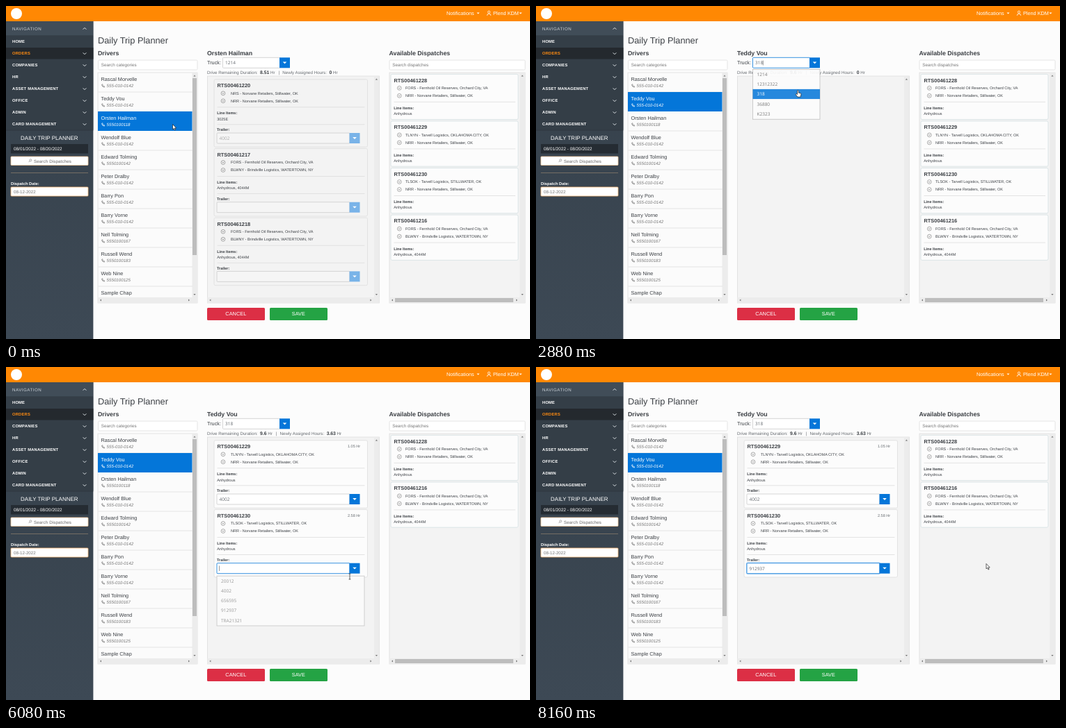
Animation of 753x480 px, one loop 8.24 s. Source, as an HTML page:

```html
<!DOCTYPE html>
<html lang="en">
<head>
<meta charset="utf-8">
<title>Daily Trip Planner</title>
<style>
html, body { margin: 0; width: 100%; height: 100%; overflow: hidden; background: #fcfcfc; }
svg { display: block; width: 100vw; height: 100vh; }
text { font-family: "Liberation Sans", Arial, sans-serif; white-space: pre; text-rendering: geometricPrecision; }
.b { font-weight: 700; }
.i { font-style: italic; }
.os { font-family: "Open Sans", sans-serif; }
</style>
</head>
<body>
<svg viewBox="0 0 753 480" preserveAspectRatio="none">
  <defs>
    <clipPath id="listClip"><path d="M132 96H268V419H132Z"/></clipPath>
    <linearGradient id="side" x2="0" y2="1">
      <stop offset="0" stop-color="#35404a"/><stop offset="1" stop-color="#3d4955"/>
    </linearGradient>
  </defs>
  <g id="base"></g>
  <g id="scene"></g>
</svg>
<script>
const LOOP = 8240, STEP = 80;
const BLUE = '#0476d9', INK = '#3b3f44', GREY = '#666b70';

// Vertical position is the middle of the capitals.
const text = (x, y, s, size, fill = INK, cls = '', more = '') =>
  `<text x="${x}" y="${y + size * 0.36}" font-size="${size}" fill="${fill}" class="${cls}" ${more}>${s}</text>`;
const rect = (x, y, w, h, fill, stroke = 'none', r = 0, more = '') =>
  `<rect x="${x}" y="${y}" width="${w}" height="${h}" fill="${fill}" stroke="${stroke}" stroke-width=".8" rx="${r}" ${more}/>`;
const line = (d, stroke, w = 0.8) => `<path d="${d}" fill="none" stroke="${stroke}" stroke-width="${w}"/>`;
const shape = (d, fill) => `<path d="${d}" fill="${fill}"/>`;
const caret = (x, y, w, fill) => shape(`M${x - w} ${y - w / 2}h${2 * w}l${-w} ${w}z`, fill);

const drivers = [
  ['Rascal Morvelle', '555-010-0142'], ['Teddy Vou', '555-010-0142'], ['Orsten Hailman', '5550100118'],
  ['Wendolf Blue', '555-010-0142'], ['Edward Tolming', '5550100142'], ['Peter Dralby', '555-010-0142'],
  ['Barry Pon', '555-010-0142'], ['Barry Vorne', '555-010-0142'], ['Nell Tolming', '5550100167'],
  ['Russell Wend', '5550100183'], ['Web Nine', '5550100125'], ['Sample Chap', '']
];

const stops = {
  oil: 'FORS - Fernhold Oil Reserves, Orchard City, VA',
  green: 'BLWNY - Brindville Logistics, WATERTOWN, NY',
  shop: 'NRR - Norvane Retailers, Stillwater, OK',
  shop2: 'NRS - Norvane Retailers, Stillwater, OK',
  city: 'TLNYN - Tarvell Logistics, OKLAHOMA CITY, OK',
  still: 'TLSOK - Tarvell Logistics, STILLWATER, OK'
};
const trip = (id, from, to, items) => ({ id: 'RTS0046' + id, from: stops[from], to: stops[to], items });
const trips = {
  1216: trip(1216, 'oil', 'green', 'Anhydrous, 4044M'),
  1217: trip(1217, 'oil', 'green', 'Anhydrous, 4044M'),
  1218: trip(1218, 'oil', 'green', 'Anhydrous, 4044M'),
  1220: trip(1220, 'shop2', 'shop', '3025E'),
  1228: trip(1228, 'oil', 'shop', 'Anhydrous'),
  1229: trip(1229, 'city', 'shop', 'Anhydrous'),
  1230: trip(1230, 'still', 'shop', 'Anhydrous')
};
const trucks = ['1214', '12312322', '318', '36880', 'K2323'];
const trailers = ['20012', '4002', '656595', '912937', 'TRA21321'];

// Time, tip x, tip y, pointer kind.
const path = [
  [0, 239.5, 170.5, 'arrow'], [320, 231, 143, 'arrow'], [720, 230.5, 142.5, 'arrow'],
  [960, 230, 139.5, 'arrow'], [1200, 230, 139.5, 'arrow'], [1680, 401, 82, 'arrow'],
  [2000, 401, 82, 'hand'], [2560, 376.5, 121.5, 'hand'], [2960, 376.5, 121.5, 'arrow'],
  [3200, 611, 205, 'arrow'], [3280, 611, 205, 'arrow'], [3680, 420, 150, 'arrow'],
  [3840, 420, 150, 'arrow'], [4000, 501, 190, 'arrow'], [4080, 501, 190, 'hand'],
  [4200, 450, 220, 'hand'], [4280, 450, 220, 'arrow'], [4400, 611, 205, 'arrow'],
  [4440, 611, 205, 'arrow'], [4880, 446.5, 271, 'arrow'], [5080, 420, 250, 'arrow'],
  [5280, 420, 250, 'arrow'], [5840, 501, 291, 'arrow'], [5960, 501, 291, 'beam'],
  [6080, 494, 302, 'beam'], [6160, 494, 303, 'hand'], [6640, 429.5, 342.5, 'hand'],
  [7040, 429.5, 342.5, 'arrow'], [7760, 647, 283.5, 'arrow'], [LOOP, 647, 283.5, 'arrow']
];
const clamp = v => Math.min(1, Math.max(0, v));
const during = (t, a, b) => t >= a && t < b;
const fade = (t, a, b, c, d) => Math.min(clamp((t - a) / (b - a)), clamp((d - t) / (d - c)));

function pointerAt(t) {
  const n = path.findIndex((p, k) => t >= p[0] && (!path[k + 1] || t < path[k + 1][0]));
  const a = path[n], b = path[n + 1] || a;
  const u = clamp((t - a[0]) / (b[0] - a[0] || 1)), e = u * u * (3 - 2 * u);
  return { x: a[1] + (b[1] - a[1]) * e, y: a[2] + (b[2] - a[2]) * e, kind: a[3] };
}

function pointer({ x, y, kind }) {
  const d = {
    arrow: 'M0 0V7.4L1.7 5.9 2.9 8.6 4.1 8 2.9 5.4H5.2Z',
    hand: 'M-1 .8C-1-.3 .7-.3 .7.8V3.6L3.6 4.2Q4.6 4.6 4.4 5.8L3.7 9.6H-.6L-3.2 6.2Q-3.4 4.8-2 5.2L-1 6.1Z',
    beam: 'M-1.4-4H1.4M0-4V4M-1.4 4H1.4'
  }[kind];
  return `<path transform="translate(${x} ${y})" d="${d}" fill="#fff" stroke="#222" stroke-width=".7"/>`;
}

function stopIcon(x, y) {
  return `<circle cx="${x}" cy="${y}" r="2.9" fill="none" stroke="#777" stroke-width=".6"/>` +
    line(`M${x - 1.3} ${y - 0.5}l1.3 1.2l1.3-1.2`, '#666', 0.7);
}

function field(x, y, w, value, { focus, off, glow } = {}) {
  return (glow ? rect(x - 0.6, y - 0.6, w + 1.2, 16.2, 'none', '#8cc0f0', 1) : '') +
    rect(x, y, w, 15, off ? '#f5f5f5' : '#fff', focus ? BLUE : '#ccc', 1) +
    rect(x + w - 0.5, y, 15, 15, off ? '#79b3e8' : BLUE) +
    caret(x + w + 7, y + 7.5, 2.8, '#fff') +
    text(x + 3.5, y + 7.7, value, 6.5, off ? '#aaa' : GREY, 'os');
}

function menu(x, y, w, list, alpha, p) {
  if (alpha <= 0) return '';
  const H = 14.2, top = y + (1 - alpha) * 6;
  const hover = alpha > 0.8 && p.x > x && p.x < x + w ? Math.floor((p.y - y) / H) : -1;
  const rows = list.map((s, k) => {
    const on = k === hover;
    return (on ? rect(x, top + k * H, w, H, BLUE) : '') +
      text(x + 6, top + k * H + 7.2, s, 6.5, on ? '#fff' : '#666', 'os');
  });
  return rect(x, top, w, H * 5 + 0.8, '#fcfcfc', '#bbb', 0, `opacity="${0.5 + alpha / 2}"`) +
    `<g opacity="${alpha}">${rows.join('')}</g>`;
}

function card(x, y, trip, { wide, trailer, off, hours } = {}) {
  const w = wide ? 220.5 : 183, h = trailer ? 97.5 : 65.3, tx = x + 4.5;
  const icon = x + (wide ? 13 : 12.3), label = x + (wide ? 24 : 21);
  const rule = dy => line(`M${tx} ${y + dy}H${x + w - 4}`, '#ddd');
  return rect(x, y, w, h, off ? '#f3f3f3' : '#fcfcfc', wide ? '#ddd' : '#d5e0e3', 2) +
    text(tx, y + 8.7, trip.id, 7.4, INK, 'b') +
    (hours ? text(x + 192, y + 8.7, hours + ' Hr', 5.5, GREY) : '') +
    stopIcon(icon, y + 20) + text(label, y + 20, trip.from, 5.5) +
    stopIcon(icon, y + 31) + text(label, y + 31, trip.to, 5.5) +
    rule(40) + text(tx - 0.3, y + 48.7, 'Line Items:', 5.5, INK, 'b') + text(tx - 0.3, y + 56.8, trip.items, 5.5) +
    (trailer ? rule(65) + text(tx - 0.5, y + 72.5, 'Trailer:', 5.5, INK, 'b') +
      field(x + 4, y + 77.2, 191, trailer.value, trailer) : '');
}

function scrollArrows(x, y, w, h) {
  const tri = (px, py, a) => `<path transform="translate(${px} ${py}) rotate(${a})" d="M-1.6 1L0-1L1.6 1Z" fill="#777"/>`;
  return rect(x + w - 7.5, y, 7.5, h, '#ececec') + rect(x, y + h - 8, w, 8, '#ececec') +
    tri(x + w - 4, y + 4.5, 0) + tri(x + w - 4, y + h - 12, 180) +
    tri(x + 4, y + h - 4, 270) + tri(x + w - 12, y + h - 4, 90);
}

function phoneIcon(x, y, color) {
  return line(`M${x} ${y - 1.8}q.4 3.2 3.8 3.8l.5-1.2l-1.4-.7l-.7.5l-1-1.1l.5-.6l-.5-1.4z`, color, 0.7);
}

function searchBox(x, w, s) {
  return rect(x, 78, w, 14, '#fff', '#ddd', 1.5) + text(x + 4.3, 85.2, s, 6.3, '#777');
}

function sidebar() {
  const items = ['HOME', 'ORDERS', 'COMPANIES', 'HR', 'ASSET MANAGEMENT', 'OFFICE', 'ADMIN', 'CARD MANAGEMENT'];
  const chevron = (y, d = 1) => line(`M110.5 ${y - d}l2.5 ${2 * d}l2.5 ${-2 * d}`, '#dde2e6', 0.9);
  const W = 125.4;
  return rect(0, 22, W, 458, 'url(#side)') + rect(0, 22, W, 20.5, '#414d58') +
    text(9, 32.5, 'NAVIGATION', 6.2, '#cbd2d8', '', 'letter-spacing=".5"') + chevron(32.5, -1) +
    rect(0, 42.5, W, 136, '#343e47') + rect(0, 60, W, 16.5, '#24292e') +
    items.map((s, k) => text(9, 51 + 17 * k, s, 5.8, k === 1 ? '#ff8c12' : '#fff', 'b', 'letter-spacing=".2"') +
      (k ? chevron(51.5 + 17 * k) : '')).join('') +
    line(`M0 179H${W}`, '#2b333b') +
    text(62.3, 190.2, 'DAILY TRIP PLANNER', 8, '#fff', '', 'text-anchor="middle"') +
    rect(7, 199, 111, 13.5, '#252c33') + text(11, 206, '08/01/2022 - 08/20/2022', 6.4, '#fff') +
    rect(7, 217, 111, 12.5, '#fff', '#f4c79a', 1) +
    text(40, 223.3, 'Search Dispatches', 6.2, '#666', '', 'letter-spacing=".12"') +
    '<circle cx="35.3" cy="222.3" r="1.5" fill="none" stroke="#777" stroke-width=".6"/>' + line('M34.2 223.4l-1.5 1.7', '#777', 0.7) +
    line('M7 240.5H118', '#85796a') +
    text(7, 256, 'Dispatch Date:', 5.8, '#fff', 'b') +
    rect(7, 261, 111, 13, '#fff', '#f3b474', 1) + text(11, 267.7, '08-12-2022', 6.2, '#777');
}

function base() {
  return rect(0, 0, 753, 480, '#fcfcfc') + rect(0, 0, 753, 22, '#ff8803') +
    '<circle cx="15" cy="11" r="8" fill="#fff"/>' +
    text(633, 10.3, 'Notifications', 7.3, '#fff') + caret(678.5, 10.5, 2, '#fff') +
    '<circle cx="694" cy="8.7" r="1.6" fill="none" stroke="#fff" stroke-width=".8"/>' +
    line('M691.3 13.8q0-2.7 2.7-2.7t2.7 2.7', '#fff') +
    text(700, 10.3, 'Plend KDM', 7.3, '#fff') + caret(739.5, 10.5, 2, '#fff') +
    sidebar() +
    text(132, 49.3, 'Daily Trip Planner', 12.8) +
    text(132, 67.4, 'Drivers', 8.8, INK, 'b') + searchBox(132.5, 142.5, 'Search categories') +
    text(550.5, 67.4, 'Available Dispatches', 8.8, INK, 'b') + searchBox(551, 195, 'Search dispatches') +
    rect(132, 96, 143, 332, '#fbfbfb', '#ddd') + scrollArrows(132, 96, 143, 332) + rect(268, 104, 6, 255, '#bdbdbd') +
    rect(289.4, 101, 247, 327, '#f3f3f3', '#ddd') + scrollArrows(289.4, 101, 247, 327) +
    rect(551, 96, 195, 332, '#f3f3f3', '#ddd') + scrollArrows(551, 96, 195, 332) + rect(559, 421, 170, 6, '#bdbdbd') +
    rect(289, 435, 83, 18, '#dc2f45', 'none', 1.5) + text(330.3, 443.7, 'CANCEL', 7.4, '#fff', '', 'text-anchor="middle"') +
    rect(379, 435, 83, 18, '#24a344', 'none', 1.5) + text(420.3, 443.7, 'SAVE', 7.3, '#fff', '', 'text-anchor="middle"') +
    text(289, 81.8, 'Truck:', 7.3);
}

function driverList(selected) {
  return '<g clip-path="url(#listClip)">' + drivers.map(([name, phone], k) => {
    const y = 96 + 28 * k, on = k === selected;
    return (on ? rect(132, y, 135.5, 28, BLUE) : line(`M132.5 ${y + 28}H268`, '#ddd')) +
      text(136.5, y + 9, name, 7.3, on ? '#fff' : INK) +
      (phone ? phoneIcon(137.5, y + 19.2, on ? '#fff' : '#777') + text(144.6, y + 19, phone, 6.2, on ? '#fff' : '#777', 'i') : '');
  }).join('') + '</g>';
}

function scene(t) {
  const p = pointerAt(t), first = t < 1200;
  const left = first ? '8.51' : '9.6';
  const assigned = t < 3840 ? '0' : t < 5120 ? '1.05' : '3.63';
  const truck = first ? '1214' : t < 2800 ? '' : '318';
  const bold = s => `<tspan class="b" dx="3.5" font-size="6.8" fill="${INK}">${s}</tspan>`;
  const midY = k => 105.8 + 99.7 * k;
  const out = [
    driverList(first ? 2 : 1),
    text(289, 67.4, drivers[first ? 2 : 1][0], 8.8, INK, 'b'),
    field(311.5, 74.3, 82, truck, { focus: during(t, 1760, 4000) }),
    during(t, 2800, 3280) ? line('M326.3 78.5v7', '#555', 0.6) : '',
    text(289, 96, `Drive Remaining Duration:${bold(left)} Hr <tspan dx="3.3">|</tspan> <tspan dx="2.4">Newly</tspan> Assigned Hours:${bold(assigned)} Hr`, 6.2, GREY)
  ];

  if (first) [1220, 1217, 1218].forEach((id, k) =>
    out.push(card(299, midY(k), trips[id], { wide: true, off: true, trailer: { value: k ? '' : '4002', off: true } })));
  if (t >= 3520) out.push(card(299, midY(0), trips[1229], {
    wide: true, hours: t >= 3840 && '1.05',
    trailer: t >= 3840 && { value: t >= 4240 ? '4002' : '', focus: during(t, 4000, 4480) }
  }));
  if (t >= 4720) out.push(card(299, midY(1), trips[1230], {
    wide: true, hours: t >= 5120 && '2.58',
    trailer: t >= 5120 && { value: t >= 7040 ? '912937' : '', focus: t >= 5960, glow: t >= 8160 }
  }));
  if (during(t, 5960, 6400)) out.push(line('M306.5 286.5v7.5', '#555', 0.6));

  [1228, 1229, 1230, 1216]
    .filter(id => !(id === 1229 && t >= 3520) && !(id === 1230 && t >= 4720))
    .forEach((id, k) => out.push(card(553, 98.3 + 67.6 * k, trips[id])));

  const dragged = during(t, 3280, 3840) ? 1229 : during(t, 4440, 5120) ? 1230 : 0;
  if (dragged) out.push(card(p.x - 58, p.y - 39.2, trips[dragged]));

  out.push(
    menu(311.5, 90.6, 96.5, trucks, fade(t, 1840, 2000, 2860, 3000), p),
    menu(303, 199.5, 212, trailers, fade(t, 3960, 4080, 4240, 4320), p),
    menu(303, 299.2, 212, trailers, fade(t, 5980, 6130, 7040, 7160), p),
    pointer(p));
  return out.join('');
}

const layer = document.getElementById('scene');
document.getElementById('base').innerHTML = base();
const start = performance.now();
let shown = -1;
function tick() {
  const elapsed = Math.max(0, performance.now() - start) % LOOP;
  const t = Math.floor(elapsed / STEP) * STEP;
  if (t !== shown) layer.innerHTML = scene(shown = t);
  requestAnimationFrame(tick);
}
tick();
</script>
</body>
</html>
```
